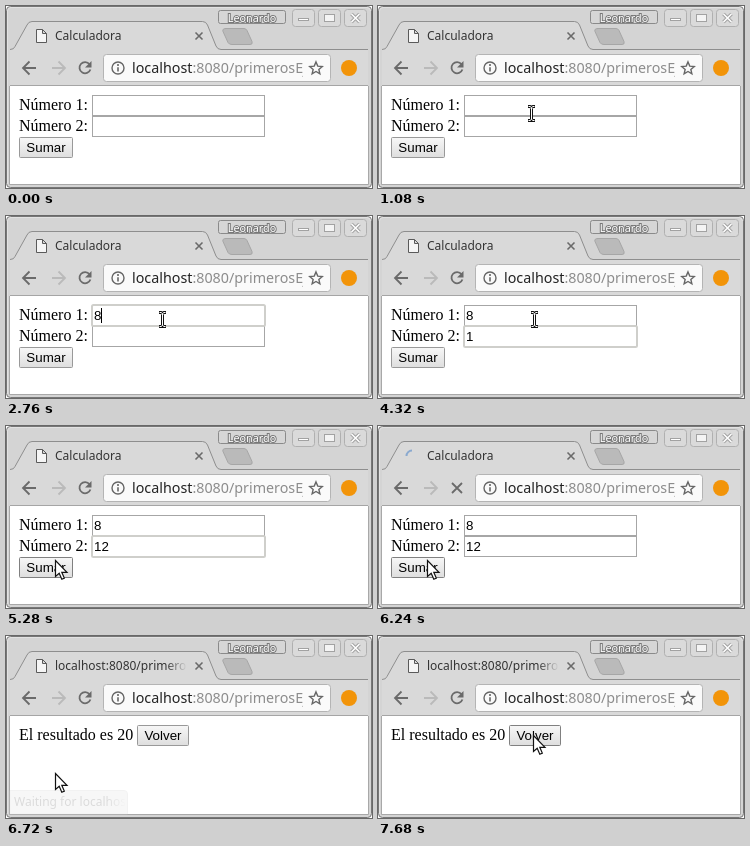
Recreate the animation shown at these times as an HTML page. Size 366 by 182 pixels, loop 8 s.

```html
<!DOCTYPE html>
<html lang="es">
<head>
<meta charset="utf-8">
<title>Calculadora</title>
<style>
  html, body { margin: 0; width: 100%; height: 100%; overflow: hidden; background: #fff; }
  svg { display: block; width: 366px; height: 182px; }
  text { white-space: pre; }
  .ui { font-family: "Noto Sans", sans-serif; font-size: 12px; }
  .page { font-family: "Liberation Serif", serif; font-size: 16px; }
  .control { font-family: "Liberation Sans", sans-serif; font-size: 13.33px; }
  .line { fill: none; stroke: #6a6a6a; stroke-width: 1.8; }
</style>
</head>
<body>
<svg viewBox="0 0 366 182">
  <defs>
    <linearGradient id="face" x2="0" y2="1">
      <stop stop-color="#f7f7f7"/><stop offset="1" stop-color="#dedede"/>
    </linearGradient>
    <linearGradient id="pressedFace" x2="0" y2="1">
      <stop stop-color="#d6d6d6"/><stop offset="1" stop-color="#ececec"/>
    </linearGradient>
    <linearGradient id="tabFade" gradientUnits="userSpaceOnUse" x1="160" x2="181">
      <stop stop-color="#333"/><stop offset="1" stop-color="#333" stop-opacity="0"/>
    </linearGradient>
    <linearGradient id="statusFade" gradientUnits="userSpaceOnUse" x1="100" x2="121">
      <stop stop-color="#999"/><stop offset="1" stop-color="#999" stop-opacity="0"/>
    </linearGradient>
    <clipPath id="urlClip"><rect x="120" y="48" width="177" height="28"/></clipPath>
    <path id="tabEdge" d="M4 43.5q4 0 5-3L21 19q1.5-3.5 5-3.5H196.5q3.5 0 5 3.5l8.5 21q1.5 3.5 5 3.5H362"/>
  </defs>

  <!-- window frame -->
  <rect width="366" height="182" fill="#fff"/>
  <rect x=".5" y=".5" width="365" height="181" rx="4" fill="#d4d4d4" stroke="#777"/>
  <path d="M1.5 178V5q0-3.5 3.5-3.5h356q3.5 0 3.5 3.5" fill="none" stroke="#e2e2e2"/>
  <rect x="212.5" y="4.5" width="67" height="13" rx="2" fill="#d6d6d6" stroke="#8a8a8a"/>
  <text class="ui" x="246" y="15.5" text-anchor="middle" style="font-size:10.8px" fill="#fff"
        stroke="#777" stroke-width="2" paint-order="stroke">Leonardo</text>
  <g fill="#dadada" stroke="#b0b0b0">
    <rect x="286.5" y="3.5" width="22" height="17" rx="3"/>
    <rect x="312.5" y="3.5" width="22" height="17" rx="3"/>
    <rect x="338.5" y="3.5" width="22" height="17" rx="3"/>
  </g>
  <g fill="none" stroke="#a2a2a2">
    <rect x="292.5" y="12.500" width="10" height="2" fill="#fff"/>
    <rect x="318.500" y="8.500" width="10" height="7" fill="#f4f4f4"/>
    <path d="M345.500 8l8 8m0-8l-8 8" stroke-width="3.500"/>
    <path d="M345.500 8l8 8m0-8l-8 8" stroke="#fff" stroke-width="1.500"/>
  </g>

  <!-- tab strip and toolbar -->
  <path d="M220 22.5h18q2 0 3 2l5 11q1 3-2 3h-18q-3 0-4-2l-5-11q-1-3 3-3z" fill="#bababa" stroke="#a6a6a6"/>
  <rect x="4" y="43" width="358" height="36" fill="#d9d9d9"/>
  <use href="#tabEdge" fill="#d9d9d9" stroke="#8e8e8e"/>
  <path id="favicon" d="M30.5 23.5h6l4 4v9h-10zM36.5 23.5v4h4" fill="#f5f5f5" stroke="#5a5a5a"/>
  <path id="spinner" d="M28.5 30A5.5 5.5 0 0 1 34 24.5" fill="none" stroke="#8aa9cf" stroke-width="2"/>
  <text id="tabTitle" class="ui" x="49" y="34" fill="url(#tabFade)"></text>
  <path class="line" d="M189.5 26.5l7 7m0-7l-7 7" style="stroke-width:1.6"/>
  <path class="line" d="M30 62H17.5M23.5 55.5L17 62l6.5 6.5"/>
  <path class="line" d="M46 62h12.5M52.5 55.5L59 62l-6.5 6.5" style="stroke:#bababa"/>
  <g id="reload">
    <path class="line" d="M83.5 58.2A5.6 5.6 0 1 0 84.4 63.5"/>
    <path d="M85.5 55v6.5h-6.5z" fill="#6a6a6a"/>
  </g>
  <path id="stop" class="line" d="M74 57l10 10m0-10l-10 10"/>
  <rect x="97.5" y="48.5" width="227" height="27" rx="3" fill="#fafafa" stroke="#b4b4b4"/>
  <circle cx="112" cy="62" r="6" fill="none" stroke="#666" stroke-width="1.4"/>
  <path d="M112 58v2m0 1.2v4.3" stroke="#666" stroke-width="1.6"/>
  <text class="ui" x="126" y="67" style="font-size:14.3px" fill="#8c8c8c" clip-path="url(#urlClip)"><tspan fill="#222">localhost</tspan>:8080/primerosEjemplos</text>
  <path id="star" fill="none" stroke="#666" stroke-width="1.4"/>
  <circle cx="343" cy="62" r="8" fill="#f29409"/>

  <!-- page -->
  <path d="M4 79.5H362" stroke="#a5a5a5"/>
  <rect x="4" y="80" width="358" height="98" fill="#fff"/>
  <path d="M3.5 80V178.5H362.5V80" fill="none" stroke="#a8a8a8"/>
  <g id="form">
    <text class="page" x="13" y="104">Número 1:</text>
    <text class="page" x="13" y="125">Número 2:</text>
    <g fill="#fff" stroke="#a6a6a6">
      <rect x="86.5" y="89.5" width="172" height="20"/>
      <rect x="86.5" y="110.5" width="172" height="20"/>
    </g>
    <rect id="ring" x="86" width="173" height="21" rx="1.5" fill="none" stroke="#cfcfcb" stroke-width="2"/>
    <text id="first" class="control" x="88" y="104"></text>
    <text id="second" class="control" x="88" y="125"></text>
    <rect id="caret" width="1" height="15"/>
    <rect id="sumFace" x="13.5" y="131.5" width="53" height="20" rx="1" stroke="#999"/>
    <text class="control" x="40" y="146" text-anchor="middle">Sumar</text>
  </g>
  <g id="result">
    <text class="page" x="13" y="104">El resultado es 20</text>
    <rect id="backFace" x="131.5" y="89.5" width="51" height="20" rx="1" stroke="#999"/>
    <text class="control" x="157" y="104" text-anchor="middle">Volver</text>
  </g>
  <g id="status">
    <path d="M4 154.5H118q3.5 0 3.5 3.5V178H4z" fill="#ebebeb" stroke="#dcdcdc"/>
    <text class="ui" x="8" y="170" fill="url(#statusFade)">Waiting for localhost...</text>
  </g>

  <path id="arrow" d="M.5 .5V16.5L4.2 13.2L6.8 19.2L9.3 18.1L6.8 12.3H12z" fill="#fff" stroke="#111" stroke-width="1.2"/>
  <g id="beam" fill="none">
    <path d="M-3.5-7H-1.5L0-6L1.5-7H3.5M0-6V6M-3.5 7H-1.5L0 6L1.5 7H3.5" stroke="#111" stroke-width="3"/>
    <path d="M-3-7H-1.5L0-6L1.5-7H3M0-6V6M-3 7H-1.5L0 6L1.5 7H3" stroke="#fff"/>
  </g>
</svg>

<script>
const LOOP = 8000, TICK = 120;
const el = id => document.getElementById(id);
const show = (id, on) => el(id).style.display = on ? "" : "none";
const within = (t, from, to) => t >= from && t < to;

// Each move: start, end, destination
const start = [344, 137];
const moves = [
  [480, 1080, 153, 107], [1200, 1560, 153, 102], [1680, 1800, 156, 103],
  [4920, 5280, 49, 134], [6480, 6600, 49, 137],
  [6960, 7320, 166, 97], [7440, 7680, 155, 99]
];
const caretSpans = [[1440, 2040], [2640, 3600], [3840, 4320], [4560, 5160], [5640, 5880]];
const statusFade = [[6360, .5], [6480, 1], [6600, .75], [6720, .35], [6840, 0]];

const starPoints = Array.from({ length: 10 }, (_, i) => {
  const r = i % 2 ? 3 : 6.6, a = i * Math.PI / 5;
  return `${310 + r * Math.sin(a)} ${62.5 - r * Math.cos(a)}`;
});
el("star").setAttribute("d", `M${starPoints.join("L")}Z`);

function pointerAt(t) {
  let [x, y] = start;
  for (const [from, to, nextX, nextY] of moves) {
    if (t < from) break;
    const p = Math.min(1, (t - from) / (to - from));
    const eased = p * p * (3 - 2 * p);
    x += (nextX - x) * eased;
    y += (nextY - y) * eased;
  }
  return [Math.round(x), Math.round(y)];
}

function paintButton(id, hover, pressed) {
  el(id).setAttribute("fill", `url(#${pressed ? "pressedFace" : "face"})`);
  el(id).setAttribute("stroke", hover ? "#808080" : "#999");
}

function render(time) {
  const t = Math.floor(time / TICK) * TICK;
  const [x, y] = pointerAt(t);
  const done = t >= 6480;
  const loading = within(t, 6120, 6480);
  const over = (left, top, right, bottom) => x >= left && x < right && y >= top && y < bottom;

  show("form", !done);
  show("result", done);
  show("spinner", loading);
  show("favicon", !loading);
  show("stop", within(t, 6120, 6600));
  show("reload", !within(t, 6120, 6600));
  el("spinner").setAttribute("transform", `rotate(${(6240 - t) / TICK * 45} 34 30)`);
  el("tabTitle").textContent = done ? "localhost:8080/primerosEjemplos" : "Calculadora";

  const first = t >= 2760 ? "8" : "";
  const second = t >= 4560 ? "12" : t >= 3840 ? "1" : "";
  const inSecond = t >= 3000;
  el("first").textContent = first;
  el("second").textContent = second;
  show("ring", within(t, 1440, 5880));
  el("ring").setAttribute("y", inSecond ? 110 : 89);
  show("caret", caretSpans.some(span => within(t, ...span)));
  el("caret").setAttribute("x", 88 + 7 * (inSecond ? second : first).length);
  el("caret").setAttribute("y", inSecond ? 113 : 92);

  paintButton("sumFace", over(13, 131, 67, 152), within(t, 5880, 6000));
  paintButton("backFace", over(131, 89, 183, 110), false);

  const fade = statusFade.filter(([from]) => t >= from).pop();
  el("status").style.opacity = fade ? fade[1] : 0;

  const beam = !done && over(86, 89, 259, 131);
  show("beam", beam);
  show("arrow", !beam && t >= 240);
  el("beam").setAttribute("transform", `translate(${x + .5} ${y + .5})`);
  el("arrow").setAttribute("transform", `translate(${x} ${y})`);
}

const origin = performance.now();
function frame() {
  render((performance.now() - origin) % LOOP);
  requestAnimationFrame(frame);
}
frame();
</script>
</body>
</html>
```
